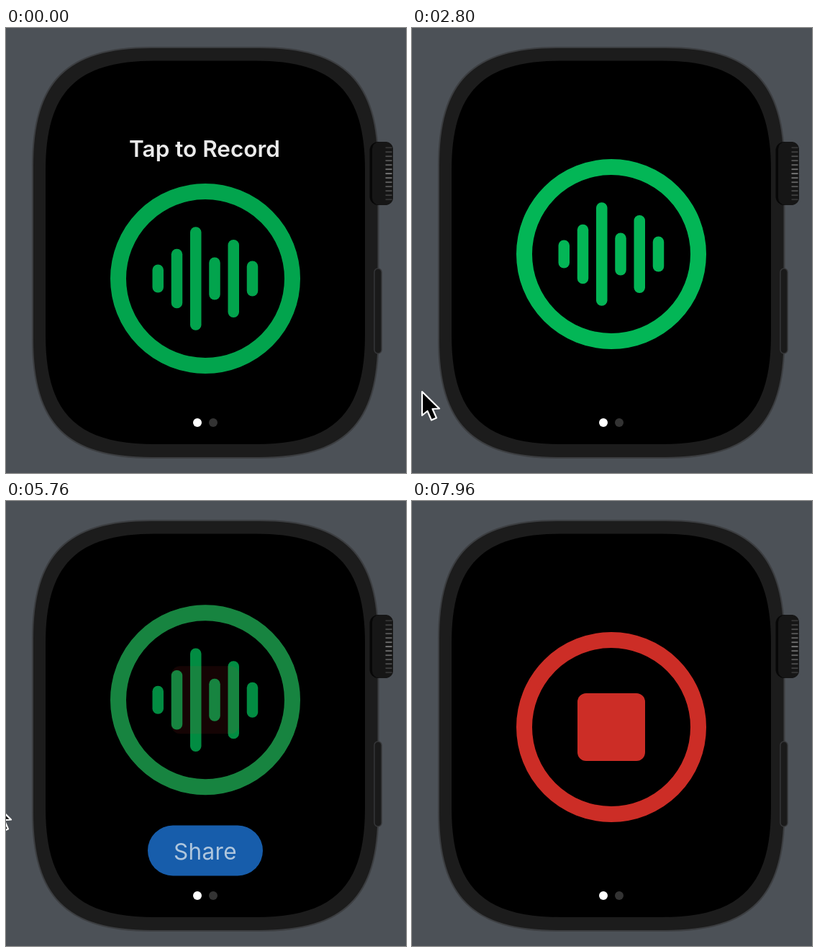
Animation of 556 by 618 pixels, one loop 8000 ms. Source, as an HTML page:

```html
<!DOCTYPE html>
<html lang="en">
<head>
<meta charset="utf-8">
<title>Voice recorder</title>
<style>
  html, body { margin: 0; width: 100%; height: 100%; overflow: hidden; background: #4c5157; }
  svg { display: block; width: 556px; height: 618px; }
  text { font-family: Inter, Roboto, sans-serif; text-anchor: middle; }
</style>
</head>
<body>
<svg viewBox="0 0 556 618">
  <rect width="556" height="618" fill="#4c5157"/>
  <path id="case" fill="#1c1c1c" stroke="#3c3e41" stroke-width="2"/>
  <path id="screen"/>
  <rect x="505.500" y="158" width="32.500" height="88" rx="12" fill="#070707"/>
  <rect x="509" y="158" width="29" height="88" rx="10" fill="#161616"/>
  <g id="crown"></g>
  <rect x="512" y="334" width="10" height="118" rx="5" fill="#1a1a1a" stroke="#353638" stroke-width="1.500"/>
  <text id="title" x="276" y="179" font-size="31.500" font-weight="600" fill="#ebebeb">Tap to Record</text>
  <g id="symbol">
    <g id="wave" fill="#04de69" stroke="#04de69">
      <circle r="121" fill="none" stroke-width="22"/>
    </g>
    <g id="stop" fill="#ff3930" stroke="#ff3930">
      <circle r="121" fill="none" stroke-width="22"/>
      <rect x="-47" y="-47" width="94" height="94" rx="12" stroke="none"/>
    </g>
  </g>
  <g id="share">
    <rect x="197" y="443" width="160" height="70" rx="35" fill="#1a68bf"/>
    <text x="277" y="490.500" font-size="31.500" letter-spacing=".4" fill="#c3ddf6">Share</text>
  </g>
  <circle cx="266" cy="548" r="6" fill="#fff"/>
  <circle cx="288" cy="548" r="6" fill="#333"/>
  <path id="cursor" d="M0 0 24 23.500 14.500 24 20 36.500 13 39.500 7.500 27 0 33Z" stroke="#fff" stroke-width="2.200" stroke-linejoin="round"/>
</svg>
<script>
const LOOP = 8000, FADE = 350;
const TITLE_OUT = 2120, RECORD = 3940, STOP = 5480, RECORD_AGAIN = 7330;
const $ = id => document.getElementById(id);

function add(parent, tag, attrs) {
  const el = document.createElementNS('http://www.w3.org/2000/svg', tag);
  for (const key in attrs) el.setAttribute(key, attrs[key]);
  parent.appendChild(el);
}

// Rounded box with continuous corners: r is the reach, c the control offset
function squircle(l, t, right, b, r, c) {
  return `M${l} ${t + r}C${l} ${t + c} ${l + c} ${t} ${l + r} ${t}
    H${right - r}C${right - c} ${t} ${right} ${t + c} ${right} ${t + r}
    V${b - r}C${right} ${b - c} ${right - c} ${b} ${right - r} ${b}
    H${l + r}C${l + c} ${b} ${l} ${b - c} ${l} ${b - r}Z`;
}
$('case').setAttribute('d', squircle(37, 27, 517.5, 597, 165, 47));
$('screen').setAttribute('d', squircle(55, 45.5, 499, 578, 152, 43));

for (let i = -6; i <= 6; i++) {
  const light = Math.round(125 - Math.abs(i) * 12);
  add($('crown'), 'rect', {
    x: 527.5, y: 201.3 + i * 6, width: 9, height: 1.8, fill: `rgb(${light},${light},${light})`
  });
}

[39, 82.5, 143.5, 59, 108, 49].forEach((h, i) => add($('wave'), 'rect', {
  x: -73.5 + i * 26.25, y: -h / 2, width: 15.5, height: h, rx: 7.5, stroke: 'none'
}));

const smooth = x => x * x * (3 - 2 * x);
const ramp = (t, start, length = FADE) => smooth(Math.min(1, Math.max(0, (t - start) / length)));
const pulse = (t, phase) => 0.785 + 0.215 * Math.cos(t * 0.00435 + phase);

// Cursor stops: time, x, y
const stops = [
  [2800, 14, 505], [3240, 288, 308], [3600, 292, 303], [3760, 292, 303],
  [4140, 39, 486], [4650, 39, 486], [5060, 292, 306], [5260, 292, 306],
  [5640, -17, 419], [6440, -17, 419], [6600, -7, 410], [6960, 290, 308],
  [7140, 290, 308], [7500, -40, 430]
];

function moveCursor(t) {
  const next = stops.findIndex(s => s[0] > t);
  $('cursor').style.visibility = next > 0 ? 'visible' : 'hidden';
  if (next < 1) return;
  const [t0, x0, y0] = stops[next - 1], [t1, x1, y1] = stops[next];
  const p = ramp(t, t0, t1 - t0);
  $('cursor').setAttribute('transform', `translate(${x0 + (x1 - x0) * p} ${y0 + (y1 - y0) * p})`);
}

function draw(t) {
  const gone = ramp(t, TITLE_OUT);
  const shown = ramp(t, STOP) - ramp(t, RECORD_AGAIN);
  const red = ramp(t, RECORD) - shown;

  $('title').setAttribute('opacity', 1 - gone);
  $('symbol').setAttribute('transform', `translate(277 ${348 - 34 * gone - 42 * shown})`);
  $('wave').setAttribute('opacity', (1 - red) * pulse(t, t < 4700 ? 1.78 : 2.04));
  $('stop').setAttribute('opacity', red * pulse(t, 1.56));
  $('share').setAttribute('opacity', shown);
  $('share').setAttribute('transform', `translate(0 ${74 * (1 - shown)})`);
  moveCursor(t);
}

const begin = performance.now();
function tick() {
  draw((performance.now() - begin) % LOOP);
  requestAnimationFrame(tick);
}
tick();
</script>
</body>
</html>
```
